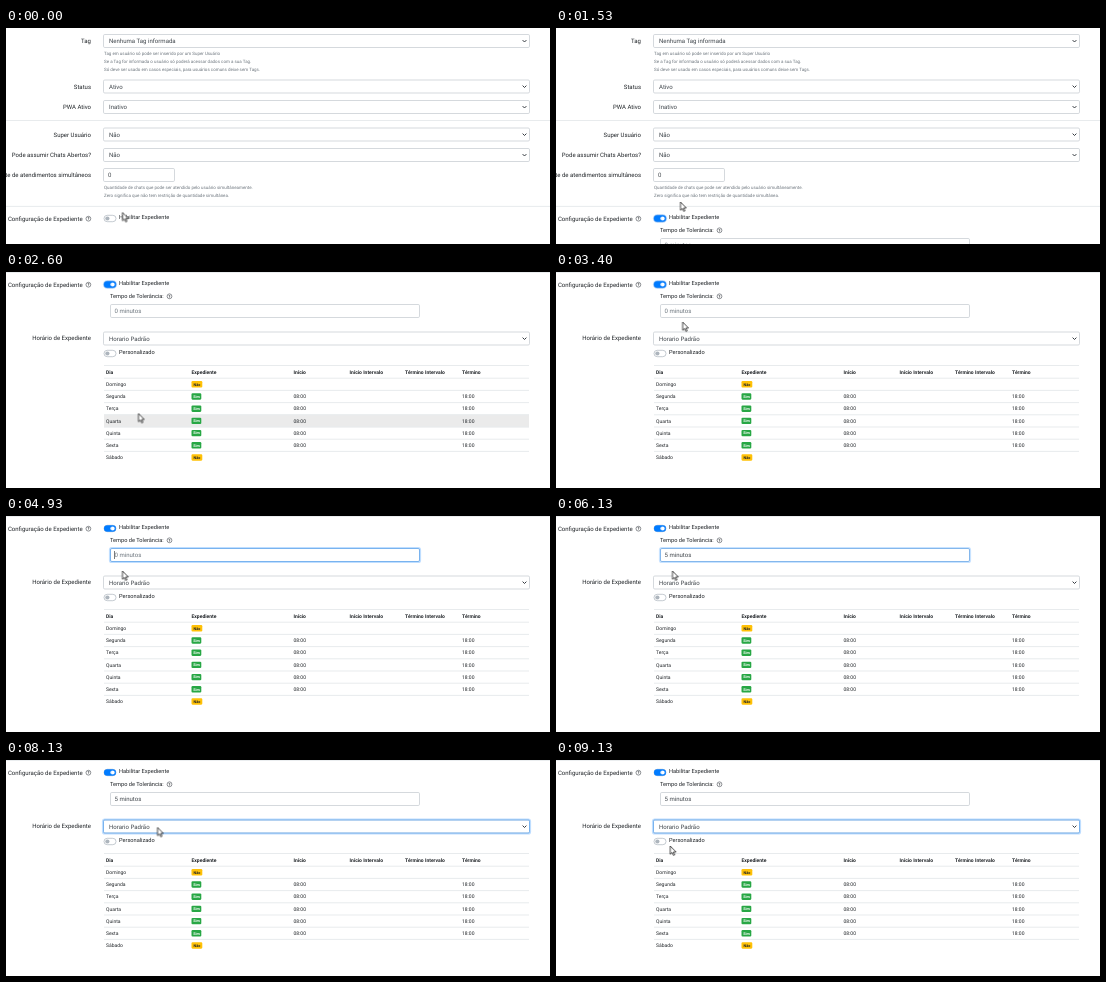
An HTML page that plays this animation: 544 px wide and 216 px high, repeating every 9.19 s.

```html
<!DOCTYPE html>
<html lang="pt-BR">
<head>
<meta charset="utf-8">
<title>Configuração de Expediente</title>
<style>
  html, body { margin: 0; width: 100%; height: 100%; overflow: hidden; background: #fff; }
  svg { display: block; width: 100vw; height: 100vh; }
  text { font-family: Roboto, Arial, sans-serif; fill: #212529; white-space: pre; text-rendering: geometricPrecision; }
  .field { fill: #fff; stroke: #c3c9cf; stroke-width: .7; }
  .value { fill: #41474d; }
  .muted { fill: #6c757d; }
  .rule { stroke: #dee2e6; stroke-width: .7; }
  .ring { fill: none; opacity: 0; }
  .ring .glow { stroke: #007bff; stroke-opacity: .25; stroke-width: 1.4; }
  .ring .edge { stroke: #65abf3; stroke-width: .8; }
  .icon { fill: none; stroke: #343a40; stroke-width: .55; }
</style>
</head>
<body>
<svg id="stage" viewBox="0 0 544 216" preserveAspectRatio="none"></svg>
<script>
const LOOP = 9190;
const LABEL = 6, VALUE = 6.05, SMALL = 5.65, CELL = 5, HELP = 4.48;
const ROW_TOP = 284.2, ROW_H = 12.2;

// Every y below is the vertical centre of the item, in page coordinates.
const text = (x, y, size, str, attrs = '') =>
  `<text x="${x}" y="${y + size * .35}" font-size="${size}" ${attrs}>${str}</text>`;
const label = (y, str, right = 85) => text(right, y, LABEL, str, 'text-anchor="end"');
const help = (y, str) => text(98, y, HELP, str, 'class="muted"');
const rule = (y, x1 = 0, x2 = 544) => `<path class="rule" d="M${x1} ${y}H${x2}"/>`;
const box = (x, y, w, cls = 'field', grow = 0) =>
  `<rect class="${cls}" x="${x - grow}" y="${y - 6.5 - grow}" width="${w + 2 * grow}" height="${13 + 2 * grow}" rx="${1.3 + grow}"/>`;
const ring = (id, x, y, w) =>
  `<g id="${id}" class="ring">${box(x, y, w, 'glow', .9)}${box(x, y, w, 'edge')}</g>`;
const select = (y, str) => box(97.5, y, 426) + text(103, y, VALUE, str, 'class="value"') +
  `<path d="M516.6 ${y - .9}l1.9 1.9 1.9-1.9" fill="none" stroke="#343a40" stroke-width="1"/>`;
const question = (x, y) => `<circle class="icon" cx="${x}" cy="${y}" r="2.4"/>` +
  text(x, y, 3.9, '?', 'text-anchor="middle" font-weight="700"');
const pill = (y, style) => `<rect x="98" y="${y - 3.2}" width="12" height="6.4" rx="3.2" ${style}/>`;
const knob = (y, style) => `<circle cx="101.4" cy="${y}" r="2.1" ${style}/>`;
const toggleOff = y => pill(y, 'fill="#fff" stroke="#adb5bd" stroke-width=".7"') + knob(y, 'fill="#adb5bd"');

const section1 = [
  label(13, 'Tag'), select(13, 'Nenhuma Tag informada'),
  help(25, 'Tag em usuário só pode ser inserido por um Super Usuário'),
  help(33.3, 'Se a Tag for informada o usuário só poderá acessar dados com a sua Tag.'),
  help(41.6, 'Só deve ser usado em casos especiais, para usuários comuns deixe sem Tags.'),
  label(58.5, 'Status'), select(58.5, 'Ativo'),
  label(79, 'PWA Ativo'), select(79, 'Inativo'),
  rule(92.5),
  label(106.5, 'Super Usuário'), select(106.5, 'Não'),
  label(127, 'Pode assumir Chats Abertos?'), select(127, 'Não'),
  label(147, 'Limite de atendimentos simultâneos'),
  box(97.5, 147, 71), text(102, 147.3, VALUE, '0', 'class="value"'),
  help(159, 'Quantidade de chats que pode ser atendido pelo usuário simultâneamente.'),
  help(167.3, 'Zero significa que não tem restrição de quantidade simultânea.'),
  rule(178.4)
].join('');

const toggleRow = [
  label(190.7, 'Configuração de Expediente', 76.6), question(82.4, 190.7),
  toggleOff(190.5),
  `<g id="on">
    <rect id="toggleFocus" x="96.9" y="186.2" width="14.2" height="8.6" rx="4.3" fill="#007bff" fill-opacity=".3"/>
    ${pill(190.5, 'fill="#007bff"')}<g id="knob">${knob(190.5, 'fill="#fff"')}</g>
  </g>`,
  text(113, 188.7, SMALL, 'Habilitar Expediente')
].join('');

const columns = [[100, 'Dia'], [185.5, 'Expediente'], [287.5, 'Início'],
  [343.5, 'Início Intervalo'], [399, 'Término Intervalo'], [456, 'Término']];
const days = ['Domingo', 'Segunda', 'Terça', 'Quarta', 'Quinta', 'Sexta', 'Sábado'];

const badge = (y, works) => {
  const width = works ? 9.8 : 10.8;
  return `<rect x="185.5" y="${y - 3.2}" width="${width}" height="6.4" rx="1.1" fill="${works ? '#28a745' : '#ffc107'}"/>` +
    text(185.5 + width / 2, y, 3.75, works ? 'Sim' : 'Não',
      `text-anchor="middle" font-weight="700" style="fill:${works ? '#fff' : '#212529'}"`);
};
const dayRow = (day, i) => {
  const y = ROW_TOP + ROW_H * (i + .5), works = i > 0 && i < 6;
  return rule(ROW_TOP + ROW_H * i, 98, 523) + text(100, y, CELL, day) + badge(y, works) +
    (works ? text(287.5, y, CELL, '08:00') + text(456, y, CELL, '18:00') : '');
};

const schedule = [
  text(104, 202.3, SMALL, 'Tempo de Tolerância:'), question(163.5, 202.3),
  box(104.5, 217, 309), ring('inputRing', 104.5, 217, 309),
  text(108.5, 217.2, VALUE, '', 'id="minutes"'),
  '<rect id="caret" x="108.2" y="213" width=".6" height="8" fill="#212529"/>',
  label(244, 'Horário de Expediente'), select(244.5, 'Horario Padrão'),
  ring('selectRing', 97.5, 244.5, 426),
  toggleOff(259.5), text(113, 258.2, SMALL, 'Personalizado'),
  rule(271.5, 98, 523),
  ...columns.map(([x, name]) => text(x, 278, CELL, name, 'font-weight="700"')),
  `<rect id="hover" x="98" y="${ROW_TOP}" width="425" height="${ROW_H}" fill="#ebebeb" opacity="0"/>`,
  ...days.map(dayRow)
].join('');

const $ = id => document.getElementById(id);
$('stage').innerHTML = `
  <g id="page">${section1}${schedule}
    <rect id="cover" y="197" width="544" height="240" fill="#fff"/>${toggleRow}
  </g>
  <path id="cursor" d="M0 0V8.3L1.9 6.5 3.2 9.4 4.5 8.8 3.2 6H5.8Z" fill="#fff" stroke="#111" stroke-width=".75" stroke-linejoin="round"/>`;

// Plays [ms, value, easing] points of one property, holding the first and last values.
function play(id, property, points, easing = 'linear') {
  const all = [[0, points[0][1]], ...points, [LOOP, points.at(-1)[1]]];
  const frames = all.map(([ms, value, ease = easing]) =>
    ({ offset: ms / LOOP, [property]: value, easing: ease }));
  $(id).animate(frames, { duration: LOOP, iterations: Infinity }).startTime = 0;
}
const move = (x, y) => `translate(${x}px, ${y}px)`;

play('page', 'transform', [
  [1760, move(0, 0), 'ease-in-out'], [2140, move(0, -158), 'linear'],
  [2190, move(0, -159), 'ease-out'], [2340, move(0, -178)]
]);
play('cover', 'transform', [[1070, move(0, 0)], [1400, move(0, 240)]], 'ease');
play('on', 'opacity', [[1000, 0], [1130, 1]]);
play('knob', 'transform', [[1000, move(0, 0)], [1130, move(5.2, 0)]], 'ease-in-out');
play('toggleFocus', 'opacity', [[3650, 1], [3730, 0]]);
play('inputRing', 'opacity', [[3640, 0], [3735, 1], [6120, 1], [6205, 0]]);
play('selectRing', 'opacity', [[7450, 0], [7590, 1]]);

play('cursor', 'transform', [
  [130, 116.5, 184.5], [200, 107, 186.5], [400, 107, 186.5], [470, 104, 187.5],
  [1180, 104, 187.5], [1520, 124.5, 174], [2330, 124.5, 173.5], [2590, 132.5, 141.5],
  [2730, 132.5, 141.5], [3590, 126, 40], [4460, 126, 40], [4600, 116.5, 55],
  [6670, 116.5, 55], [7260, 154.5, 67], [7600, 154.5, 67], [8330, 151, 67.5],
  [8600, 151, 67.5], [9120, 114.2, 86]
].map(([ms, x, y]) => [ms, move(x, y)]), 'ease-in-out');

const rowAt = i => move(0, ROW_H * i);
play('hover', 'transform', [[2400, rowAt(5)], [2450, rowAt(4)], [2520, rowAt(3)],
  [2810, rowAt(2)], [2960, rowAt(1)], [3060, rowAt(0)]], 'step-end');
play('hover', 'opacity', [[2390, 0], [2400, 1], [3120, 0]], 'step-end');

const typed = '5 minutos', minutes = $('minutes'), caret = $('caret');
let shown = null;
function draw() {
  const t = performance.now() % LOOP;
  const count = Math.max(0, Math.min(typed.length, Math.floor((t - 5000) / 100) + 1));
  if (count !== shown) {
    shown = count;
    minutes.textContent = count ? typed.slice(0, count) : '0 minutos';
    minutes.setAttribute('class', count ? 'value' : 'muted');
    caret.setAttribute('x', 108.2 + (count ? minutes.getComputedTextLength() + .4 : 0));
  }
  const lit = (t >= 3670 && t < 4000) || (t >= 4500 && t < 6130);
  caret.setAttribute('visibility', lit ? 'visible' : 'hidden');
  requestAnimationFrame(draw);
}
draw();
</script>
</body>
</html>
```
